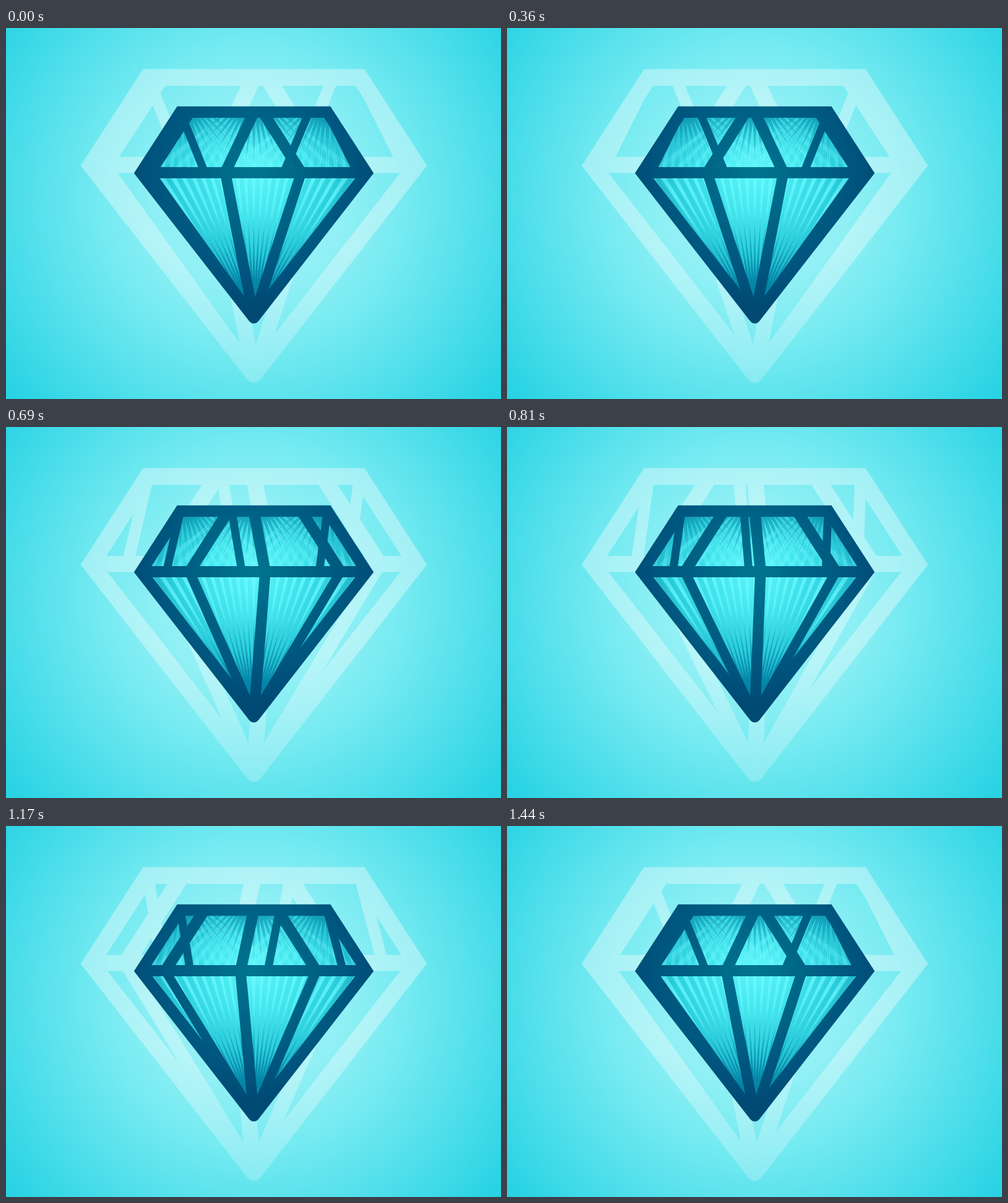
Recreate the animation shown at these times as an HTML page. Size 800 px wide and 600 px high, loop 1470 ms.

```html
<!DOCTYPE html>
<html lang="en">
<head>
<meta charset="utf-8">
<title>Turning diamond</title>
<style>
  html, body { margin: 0; width: 100%; height: 100%; overflow: hidden; background: #2ad3e3; }
  svg { display: block; width: 100vw; height: 100vh; }
</style>
</head>
<body>
<svg viewBox="0 0 800 600" xmlns="http://www.w3.org/2000/svg">
  <defs>
    <radialGradient id="sky" gradientUnits="userSpaceOnUse" cx="400" cy="275" r="500">
      <stop offset="0" stop-color="#a6f5f8"/>
      <stop offset=".3" stop-color="#90f0f5"/>
      <stop offset=".5" stop-color="#74eaf1"/>
      <stop offset="1" stop-color="#29d3e4"/>
    </radialGradient>
    <radialGradient id="metal" gradientUnits="userSpaceOnUse" cx="400.5" cy="234" r="215">
      <stop offset="0" stop-color="#007590"/>
      <stop offset=".8" stop-color="#00527c"/>
      <stop offset="1" stop-color="#004a74"/>
    </radialGradient>
    <radialGradient id="glass" gradientUnits="userSpaceOnUse" cx="400.5" cy="234" r="215">
      <stop offset="0" stop-color="#5df4fa"/>
      <stop offset=".3" stop-color="#44e6ee"/>
      <stop offset=".6" stop-color="#2bcfdd"/>
      <stop offset="1" stop-color="#0c8fae"/>
    </radialGradient>
    <linearGradient id="mist" gradientUnits="userSpaceOnUse" x1="0" y1="330" x2="0" y2="478">
      <stop offset="0" stop-color="#fff"/>
      <stop offset="1" stop-color="#c6f5f9"/>
    </linearGradient>
    <clipPath id="crown"><path d="M218.5 234L281.5 136H519.5L582.5 234Z"/></clipPath>
    <clipPath id="base"><path d="M218.5 234H582.5L400.5 468Z"/></clipPath>
    <g id="frame">
      <path fill="none" stroke-width="18.6" stroke-linecap="round" stroke-linejoin="miter"
        d="M400.5 468.5L582.8 234.3L519.3 136H281.7L218.2 234.3L400.5 468.5"/>
      <path fill="none" stroke-width="18" d="M218.5 234H582.5"/>
      <path id="front" fill="none" stroke-width="18"/>
      <path id="back" fill="none" stroke-width="13"/>
      <path id="shafts" stroke="none"/>
    </g>
  </defs>
  <rect width="800" height="600" fill="url(#sky)"/>
  <use href="#frame" fill="url(#mist)" stroke="url(#mist)" opacity=".36"
    transform="translate(-178 -116.4) scale(1.4444)"/>
  <path d="M218.5 234L281.5 136H519.5L582.5 234L400.5 468Z" fill="url(#glass)"/>
  <g id="topRays" clip-path="url(#crown)"></g>
  <g id="lowRays" clip-path="url(#base)"></g>
  <use href="#frame" fill="url(#metal)" stroke="url(#metal)"/>
</svg>
<script>
const $ = id => document.getElementById(id);
const TIP = [400.5, 468], TOP = 136, BELT = 234, HALF = 8.75;
const LOOP = 1470, STEPS = 40, REST = 0.125;

function add(parent, tag, attrs) {
  const el = document.createElementNS('http://www.w3.org/2000/svg', tag);
  for (const k in attrs) el.setAttribute(k, attrs[k]);
  parent.appendChild(el);
  return el;
}

// Radial fade around a point; each stop is [offset, opacity].
function fade(id, [cx, cy], r, color, stops) {
  const grad = add(document.querySelector('defs'), 'radialGradient',
    { id, cx, cy, r, gradientUnits: 'userSpaceOnUse' });
  for (const [offset, alpha] of stops)
    add(grad, 'stop', { offset, 'stop-color': color, 'stop-opacity': alpha });
  return `url(#${id})`;
}

// Fan of rays around angle mid: wedges widen outwards, spikes taper to a point.
function fan([x, y], mid, count, step, near, far, spikes) {
  const at = (r, a) => (x + r * Math.cos(a)).toFixed(1) + ' ' + (y + r * Math.sin(a)).toFixed(1);
  let d = '';
  for (let i = -count; i <= count; i++) {
    const a = mid + i * step, h = step * (spikes ? 0.5 : 0.25);
    d += spikes
      ? `M${at(0, a)}L${at(near, a - h)}L${at(far, a)}L${at(near, a + h)}Z`
      : `M${at(near, a)}L${at(far, a - h)}L${at(far, a + h)}Z`;
  }
  return d;
}

function drawRays() {
  const up = -Math.PI / 2, down = Math.PI / 2;
  add($('lowRays'), 'path', {
    d: fan(TIP, up, 12, 0.058, 105, 310),
    fill: fade('beam', TIP, 300, '#6ffbff', [[0.3, 0], [0.6, 0.5], [0.78, 0.7], [1, 0.4]])
  });
  add($('lowRays'), 'path', {
    d: fan(TIP, up, 12, 0.058, 62, 182, true),
    fill: fade('deep', TIP, 185, '#007fa2', [[0.2, 0.9], [0.55, 0.6], [1, 0.15]])
  });
  [281.5, 400.5, 519.5].forEach((x, i) => {
    const p = [x, 100];
    add($('topRays'), 'path', {
      d: fan(p, down, 8, 0.11, 40, 200),
      fill: fade('glow' + i, p, 180, '#6ffbff', [[0.2, 0.15], [0.6, 0.4], [1, 0.2]])
    });
    add($('topRays'), 'path', {
      d: fan(p, down, 8, 0.11, 52, 128, true),
      fill: fade('dusk' + i, p, 130, '#007fa2', [[0.3, 0.65], [0.6, 0.4], [1, 0.1]])
    });
  });
}

// Facet edges: top x from/to, belt x from/to; front ones continue to the tip.
const FRONT = [[519, 400.5, 583, 462], [400.5, 400.5, 462, 339], [400.5, 282, 339, 218]];
const BACK = [[282, 282, 218, 336], [282, 519, 336, 465], [519, 519, 465, 583]];

function render(now) {
  const q = (pose(now % LOOP) / STEPS - REST + 1) % 1;
  const mix = (a, b) => a + (b - a) * q;
  const edge = ([a, b, c, d]) => `M${mix(a, b)} ${TOP}L${mix(c, d)} ${BELT}`;
  const shaft = ([, , c, d]) => {
    const x = mix(c, d), [tx, ty] = TIP;
    return `M${x - HALF} ${BELT}H${x + HALF}L${tx + HALF} ${ty}H${tx - HALF}Z`;
  };
  $('front').setAttribute('d', FRONT.map(edge).join(''));
  $('back').setAttribute('d', BACK.map(edge).join(''));
  $('shafts').setAttribute('d', FRONT.map(shaft).join(''));
}

// Five poses per 180 ms; the first is held twice as long.
function pose(t) {
  const r = t % 180;
  return Math.floor(t / 180) * 5 + Math.max(0, Math.floor(r / 30) - 1);
}

function tick() {
  render(performance.now());
  requestAnimationFrame(tick);
}

drawRays();
tick();
</script>
</body>
</html>
```
